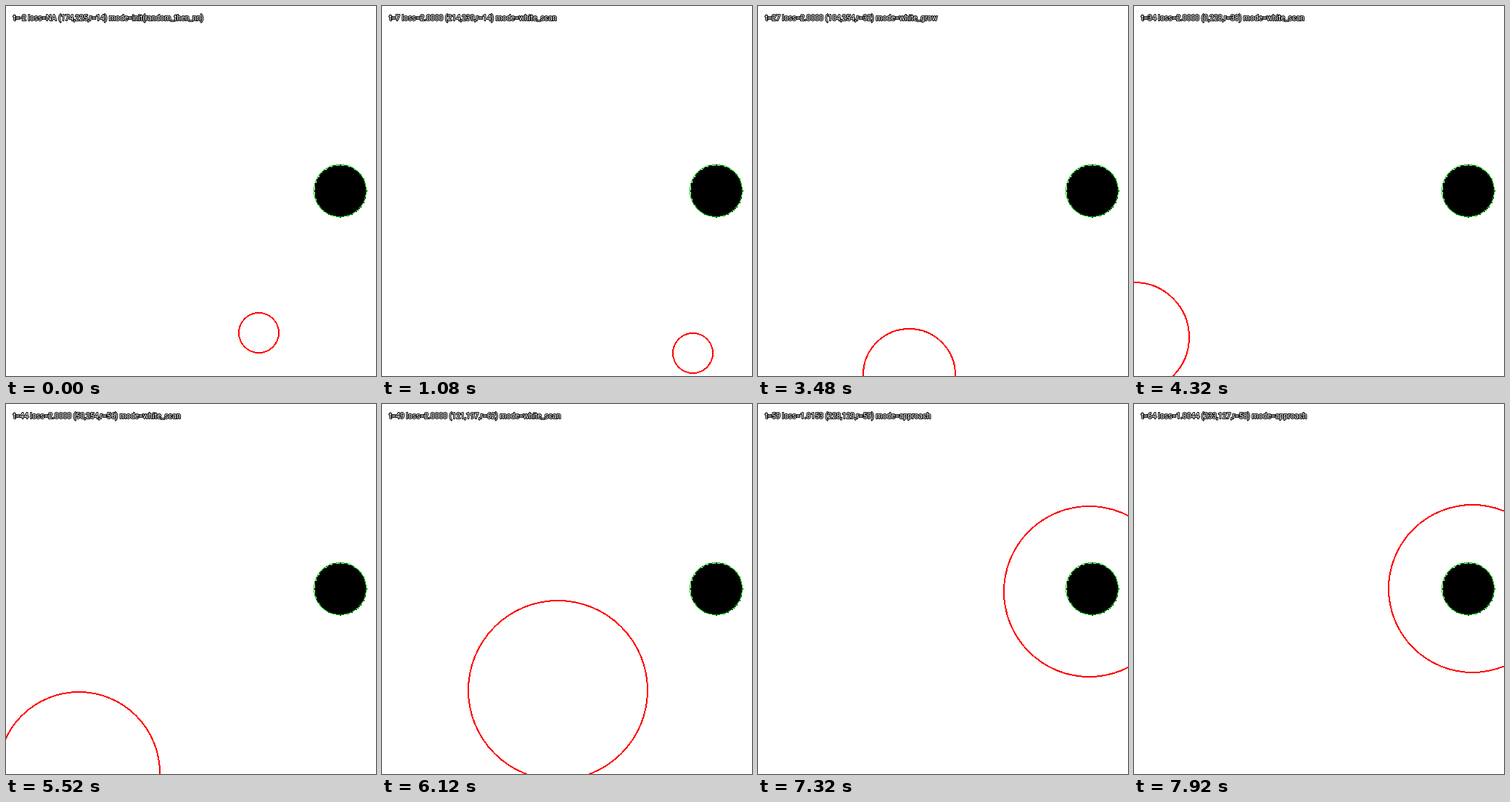
Recreate the animation shown at these times as an HTML page. Size 510 px wide and 510 px high, loop 8 s.

```html
<!DOCTYPE html>
<html lang="en">
<head>
<meta charset="utf-8">
<style>
  html, body { margin: 0; width: 100%; height: 100%; overflow: hidden; background: #fff; }
  svg { display: block; width: 510px; height: 510px; }
  circle, path { shape-rendering: crispEdges; }
  circle { fill: none; }
  text {
    font: 10.4px Roboto, sans-serif;
    fill: #fff; stroke: #000; stroke-width: 2px; stroke-linejoin: round; paint-order: stroke;
  }
</style>
</head>
<body>
<svg viewBox="0 0 510 510">
  <path id="disc"/>
  <circle cx="460.5" cy="254.5" r="36" stroke="#00c800"/>
  <circle id="probe" stroke="#f00" stroke-width="2"/>
  <text id="label" x="10" y="20"></text>
</svg>
<script>
const LOOP = 8000, STEP = 120, SCALE = 2;
const FIRST = -2, CONTACT = 54, LAST = 64;
const [disc, probe, label] = ['disc', 'probe', 'label'].map(id => document.getElementById(id));

// Turning points of the search, in unscaled image pixels.
const turns = [
  { t: FIRST, x: 174, y: 225 },
  { t: 5, x: 246, y: 246 },
  { t: 16, x: 72, y: 209 },
  { t: 23, x: 240, y: 220 },
  { t: 27, x: 104, y: 254 },
  { t: 34, x: 0, y: 228 },
  { t: 44, x: 50, y: 254 },
  { t: CONTACT, x: 192, y: 139 },
  { t: LAST, x: 233, y: 127 }
];

const mix = (a, b, p) => a + (b - a) * p;
const easeOut = p => 1 - (1 - p) ** 3;
const approach = t => easeOut((t - CONTACT) / (LAST - CONTACT));

function positionAt(t) {
  const i = Math.max(1, turns.findIndex(turn => turn.t >= t));
  const from = turns[i - 1], to = turns[i];
  const p = t > CONTACT ? approach(t) : (t - from.t) / (to.t - from.t);
  return [Math.round(mix(from.x, to.x, p)), Math.round(mix(from.y, to.y, p))];
}

// The probe grows every fourth step until it touches the disc, then shrinks.
function radiusAt(t) {
  if (t > CONTACT) return Math.round(mix(68, 58, approach(t)));
  return 14 + 6 * Math.max(0, Math.floor((t - 15) / 4));
}

function lossAt(t) {
  if (t < 0) return 'NA';
  return (t < CONTACT ? 2 : mix(1.8912, 1.8044, approach(t))).toFixed(4);
}

function modeAt(t) {
  if (t < 0) return 'init(random_then_nn)';
  if (t > CONTACT) return 'approach';
  return radiusAt(t) > radiusAt(t - 1) ? 'white_grow' : 'white_scan';
}

// Disc of doubled pixels, one strip per row.
function discPath(cx, cy, r) {
  let d = '';
  for (let dy = -r; dy <= r; dy++) {
    const half = Math.floor(Math.sqrt(r * r - dy * dy));
    const width = SCALE * (2 * half + 1);
    d += `M${SCALE * (cx - half)} ${SCALE * (cy + dy)}h${width}v${SCALE}h${-width}z`;
  }
  return d;
}

function draw(now) {
  const t = Math.floor((now % LOOP) / STEP) + FIRST;
  const [x, y] = positionAt(t), r = radiusAt(t);
  probe.setAttribute('cx', SCALE * x + 0.5);
  probe.setAttribute('cy', SCALE * y + 0.5);
  probe.setAttribute('r', SCALE * r - 0.5);
  label.textContent = `t=${t} loss=${lossAt(t)} (${x},${y},r=${r}) mode=${modeAt(t)}`;
}

disc.setAttribute('d', discPath(230, 127, 18));
const start = performance.now();
function tick() {
  draw(performance.now() - start);
  requestAnimationFrame(tick);
}
tick();
</script>
</body>
</html>
```
